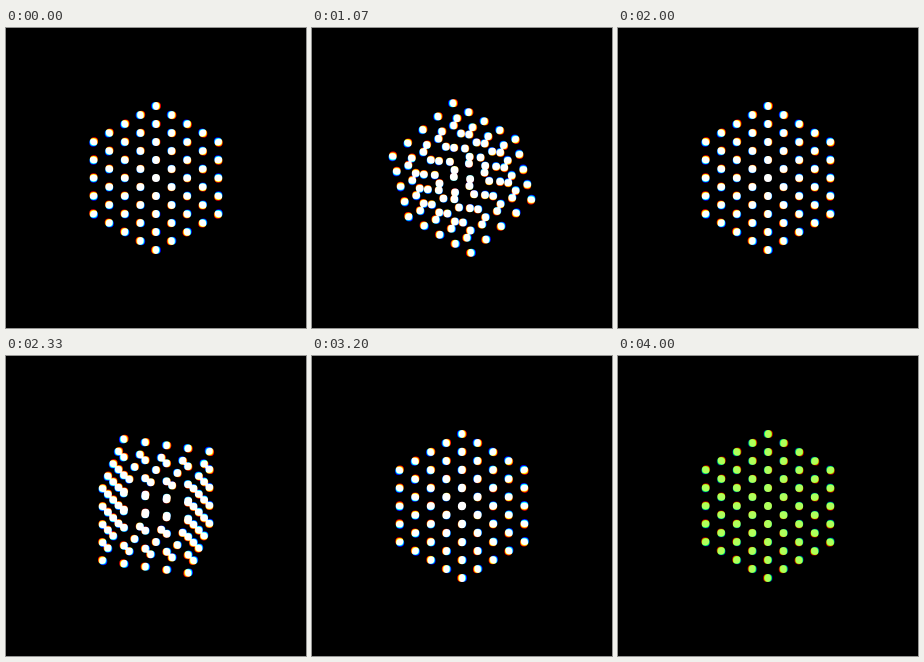
Animation of 300 by 300 pixels, one loop 4.07 s. Source, as an HTML page with a canvas:

```html
<!DOCTYPE html>
<html lang="en">
<head>
<meta charset="utf-8">
<title>Turning cube of dots</title>
<style>
  html, body { margin: 0; width: 100%; height: 100%; overflow: hidden; background: #000; }
  canvas { display: block; width: 300px; height: 300px; }
</style>
</head>
<body>
<canvas id="stage" width="300" height="300"></canvas>
<script>
const ctx = document.getElementById('stage').getContext('2d');
const LOOP = 4070, LAST = 60;
// In steps: one turn with its rest, the swing itself, and when it is halfway
const TURN = 10, SWING = 8.7, HALFWAY = 4.27;
const RADIUS = 4, SPLIT = 0.013;

// Projected cube axes, seen along the body diagonal
const H = 18 * Math.sqrt(3) / 2;
const AXES = [[0, -18], [H, 9], [-H, 9]];
// Each turn keeps one axis and swings the first of these towards the second
const TURNS = [[1, 2], [2, 0], [1, 0]];
const GREEN_STEPS = [24, 60];

// Lattice points on the cube's surface
const points = [];
for (let i = -2; i <= 2; i++)
  for (let j = -2; j <= 2; j++)
    for (let k = -2; k <= 2; k++)
      if (Math.max(Math.abs(i), Math.abs(j), Math.abs(k)) === 2) points.push([i, j, k]);

const clamp = t => Math.max(0, Math.min(1, t));
const ease = t => t ** 3 * (10 - 15 * t + 6 * t * t);
const mix = (a, p, b, q) => [a[0] * p + b[0] * q, a[1] * p + b[1] * q];

function pose(step) {
  const t = clamp((step % TURN - HALFWAY) / SWING + 0.5);
  const angle = ease(t) * Math.PI / 2;
  const [from, to] = TURNS[Math.floor(step / TURN) % 3];
  const c = Math.cos(angle), s = Math.sin(angle);
  const axes = AXES.slice();
  axes[from] = mix(AXES[from], c, AXES[to], s);
  axes[to] = mix(AXES[to], c, AXES[from], -s);
  return axes;
}

function drawLayer(axes, color, twist) {
  ctx.setTransform(1, 0, 0, 1, 150, 150);
  ctx.rotate(twist);
  ctx.beginPath();
  for (const p of points) {
    const x = p[0] * axes[0][0] + p[1] * axes[1][0] + p[2] * axes[2][0];
    const y = p[0] * axes[0][1] + p[1] * axes[1][1] + p[2] * axes[2][1];
    ctx.moveTo(x + RADIUS, y);
    ctx.arc(x, y, RADIUS, 0, 2 * Math.PI);
  }
  ctx.fillStyle = color;
  ctx.fill();
}

function draw(now) {
  const step = Math.min(LAST, Math.floor((now % LOOP + 5) * 0.015));
  const green = GREEN_STEPS.includes(step);
  const axes = pose(step);
  ctx.setTransform(1, 0, 0, 1, 0, 0);
  ctx.filter = 'none';
  ctx.globalCompositeOperation = 'source-over';
  ctx.fillStyle = '#000';
  ctx.fillRect(0, 0, 300, 300);
  ctx.filter = 'blur(0.6px)';
  ctx.globalCompositeOperation = 'lighter';
  drawLayer(axes, green ? '#b00000' : '#f00', SPLIT);
  drawLayer(axes, '#0f0', 0);
  drawLayer(axes, green ? '#00005c' : '#00f', -SPLIT);
}

const start = performance.now();
function tick() {
  draw(performance.now() - start);
  requestAnimationFrame(tick);
}
tick();
</script>
</body>
</html>
```
